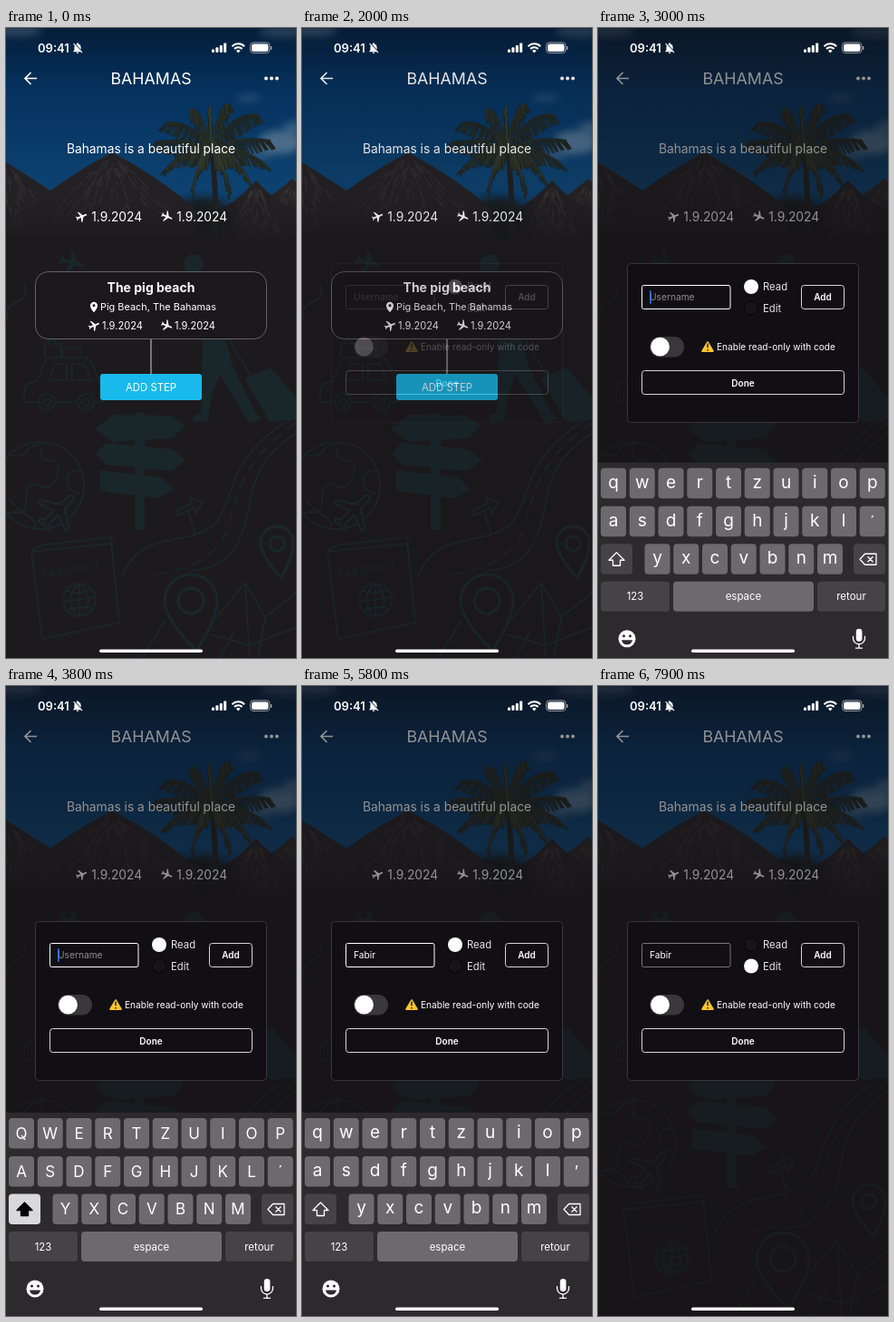
An HTML page for the animation above (8000 ms loop, 320 px wide and 694 px high).

```html
<!DOCTYPE html>
<html lang="en">
<head>
<meta charset="utf-8">
<title>Trip sharing</title>
<style>
html, body { margin: 0; height: 100%; overflow: hidden; background: #1d1a1d; }
svg { display: block; width: 100vw; height: 100vh; }
text { font-family: Inter, Roboto, sans-serif; white-space: pre; }
</style>
</head>
<body>
<svg id="stage" viewBox="0 0 320 694" fill="#fff"></svg>
<script>
const icons = {
  plane: 'M21 16v-2l-8-5V3.5C13 2.7 12.3 2 11.5 2S10 2.7 10 3.5V9l-8 5v2l8-2.5V19l-2 1.5V22l3.5-1 3.5 1v-1.5L13 19v-5.5z',
  pin: 'M12 2C8.1 2 5 5.1 5 9c0 5.3 7 13 7 13s7-7.7 7-13c0-3.9-3.1-7-7-7zm0 9.5a2.5 2.5 0 1 1 0-5 2.5 2.5 0 0 1 0 5z',
  share: 'M18 16a3 3 0 0 0-2 .8l-7-4.1a3 3 0 0 0 0-1.4l7-4.1a3 3 0 1 0-1-1.5L8 9.8a3 3 0 1 0 0 4.4l7.1 4.2A2.9 2.9 0 1 0 18 16z',
  edit: 'M3 17.2V21h3.8L17.8 9.9l-3.7-3.7zM20.7 7a1 1 0 0 0 0-1.4l-2.3-2.3a1 1 0 0 0-1.4 0l-1.9 1.8 3.8 3.8z',
  bin: 'M6 19a2 2 0 0 0 2 2h8a2 2 0 0 0 2-2V7H6zM19 4h-3.5l-1-1h-5l-1 1H5v2h14z',
  bell: 'M20 18.7L5.3 3.5 4 4.8l2.8 2.8A7 7 0 0 0 6 11v5l-2 2v1h13.7l2 2 1.3-1.3zM12 22a2 2 0 0 0 2-2h-4a2 2 0 0 0 2 2zm6-7.3V11c0-3.1-1.6-5.6-4.5-6.3V4a1.5 1.5 0 0 0-3 0v.7l-1.4.5z',
};
const icon = (name, x, y, size, turn = 0, attr = '') =>
  `<path transform="translate(${x} ${y}) rotate(${turn}) scale(${size / 24}) translate(-12 -12)" d="${icons[name]}" ${attr}/>`;
// y is the middle of the capital letters
const text = (x, y, str, size, attr = 'text-anchor="middle"') =>
  `<text x="${x}" y="${y + size * .364}" font-size="${size}" ${attr}>${str}</text>`;
const box = (x, y, w, h, r, attr = '') =>
  `<rect x="${x}" y="${y}" width="${w}" height="${h}" rx="${r}" ${attr}/>`;
const dot = (x, y, r, attr = '') => `<circle cx="${x}" cy="${y}" r="${r}" ${attr}/>`;
const path = (d, attr = '') => `<path d="${d}" ${attr}/>`;

let seed = 7;
const rand = () => (seed = seed * 16807 % 2147483647) / 2147483647;

function hut(x, y, left, right, colour) {
  const half = (right - left) / 2;
  const d = `M${x} ${y}Q${x - half * .55} ${y + 27} ${left} 200V232H${right}V200Q${x + half * .55} ${y + 27} ${x} ${y}`;
  let straw = '';
  for (let i = 0; i < 110; i++) {
    const side = (rand() * 2 - 1) * half * .85, a = .1 + rand() * .8, b = a + .05 + rand() * .1;
    straw += `M${x + side * a} ${y + 75 * a}L${x + side * b} ${y + 75 * b}`;
  }
  return path(d, `fill="${colour}"`) + path(straw, 'stroke="#57504d" stroke-width=".8" opacity=".4"');
}

function palm(cx, cy, tips) {
  let d = '';
  for (const [x, y] of tips) {
    const mx = (cx + x) / 2, my = Math.min(cy, y) - 6;
    d += `M${cx} ${cy}Q${mx} ${my} ${x} ${y}`;
    for (let t = .1; t < 1; t += .035) {
      const u = 1 - t, px = u * u * cx + 2 * u * t * mx + t * t * x, py = u * u * cy + 2 * u * t * my + t * t * y;
      const len = 26 * (1 - t * .65);
      d += `M${px} ${py}l${(x - cx) / 8 + rand() * 6 - 3} ${len}`;
    }
  }
  return path(`M${cx - 2} ${cy}q6 50 4 102h7q0-55-5-102z`, 'fill="#211f1f"') +
    path(d, 'fill="none" stroke="#171e20" stroke-width="2"') +
    path(d, 'fill="none" stroke="#3b412f" stroke-width=".6" opacity=".7"');
}

const blur = (x, y, rx, ry, opacity, colour = '#8094a6') =>
  `<ellipse cx="${x}" cy="${y}" rx="${rx}" ry="${ry}" fill="${colour}" opacity="${opacity}" filter="url(#soft)"/>`;

const photo = `<g clip-path="url(#photo)">${box(0, 0, 320, 232, 0, 'fill="url(#sky)"')}
  ${blur(12, 3, 28, 6, .35)}${blur(305, 4, 26, 6, .3)}${blur(302, 126, 24, 13, .55)}${blur(268, 77, 14, 4, .25)}
  ${blur(276, 140, 18, 6, .3)}${blur(318, 110, 12, 7, .4)}
  ${hut(0, 148, -80, 80, '#242124')}${hut(316, 166, 262, 376, '#282426')}${hut(276, 168, 232, 322, '#242124')}
  ${blur(216, 212, 34, 26, .95, '#191c1e')}
  ${palm(226, 133, [[164, 126], [176, 105], [203, 90], [225, 86], [247, 84], [279, 96], [292, 124], [286, 150], [270, 172], [246, 182], [206, 180], [177, 155]])}
  ${hut(117, 137, 22, 210, '#242124')}
  ${box(0, 180, 320, 52, 0, 'fill="url(#fade)"')}</g>`;

const doodles = `<g fill="none" stroke="#19282c" stroke-width="1.7" stroke-linejoin="round">
  <g fill="#19262a" stroke="none">${icon('plane', 73, 259, 34, 105)}${dot(207, 260, 11)}
  ${path('M190 272h38l15 71 7 29 26 53 6 5-13 6-33-54-9 23-4 28-16 1v-7l8-3 2-82z')}
  ${path('M263 386l29-12 28 33v24l-29 3z')}
  ${path('M142 424h11v129h-11zM118 426l65 1 14 11-13 14-66 4-20-14zM110 457l74 7 14 13-16 11-72-7-11-12zM104 487l68 8 14 13-16 10-66-8z')}</g>
  ${path('M243 338l27 45M20 283q5 14-9 19t-8 22')}
  ${path('M43 363v-15h18v15M62 363v-10h20v10M47 348v-4h8v4M20 412v-13q1-9 14-10l10-22q2-4 6-4h37q4 0 7 5l9 21q4 2 4 9v14H98M36 412H20M55 412h22M48 388l6-18h13v18zM73 388v-18h13l8 18z')}
  ${dot(45, 412, 9)}${dot(45, 412, 4)}${dot(88, 412, 9)}${dot(88, 412, 4)}
  ${dot(38, 504, 48)}
  ${path('M5 470q14 4 18-4t20-8M40 463q-6 12 8 13t8 18-20 10-14 17-18-3M84 489q-14-6-16 8t14 16M2 535q14-5 24 4t4 11')}
  ${icon('plane', 58, 533, 56, 45, 'fill="#1d1a1d" stroke-width="1"')}
  ${path('M28 577l10-7 78-9 9 94-85 18zM28 577l88-9 9 87M28 577l12 96')}
  ${dot(81, 630, 18)}${path('M63 632l36-5M81 612v36M81 612q-20 18 0 36M81 612q20 18 0 36M66 620q15 5 29-2M67 641q15-5 28-2')}
  ${path('M129 602c20-48 68-32 97-52s10-78 94-122M202 598c52-2 61-42 67-76s18-54 51-76')}
  ${path('M165 602c50-7 75-27 83-62s20-70 72-105', 'stroke-dasharray="12 9"')}
  ${path('M187 532l18-8-2-6 13 5-6 12-2-6-19 8zM201 531l8 27')}
  ${path('M210 686q-35-35-35-55a29 29 0 0 1 58 0q0 20-23 55zM304 606q-23-25-23-39a18 18 0 0 1 36 0q0 14-13 39z', 'stroke-width="3"')}
  ${dot(204, 631, 14, 'stroke-width="3"')}${dot(299, 568, 8, 'stroke-width="3"')}
  ${path('M150 694l26-42M230 652l34-41 22 38 34-27M264 611l5 83M286 649l-8 45M226 668l43 12 51-20M236 694l16-30')}
  </g>${text(72, 597, 'PASSPORT', 11, 'text-anchor="middle" fill="#19282c" letter-spacing="1" transform="rotate(-9 72 597)"')}`;

const dates = (x, y, gap, size) => [0, 1].map(i => icon('plane', x + gap * i, y, 14.8, i ? 113 : 68) +
  text(x + gap * i + size * .78, y, '1.9.2024', size, '')).join('');

const page = `${photo}${doodles}
  ${path('M34 55.5H21M27.5 49L21 55.5l6.5 6.5', 'fill="none" stroke="#fff" stroke-width="1.7"')}
  ${text(160, 56, 'BAHAMAS', 17.8)}${[287, 293, 299].map(x => dot(x, 55.5, 2)).join('')}
  ${text(160, 133, 'Bahamas is a beautiful place', 13.8)}${dates(83.5, 208, 94, 13.8)}
  ${box(32.5, 268.5, 255, 74, 14, 'fill="#1b181b" stroke="#77757a" stroke-width=".8"')}
  ${text(160, 286, 'The pig beach', 14, 'text-anchor="middle" font-weight="700"')}
  ${icon('pin', 97, 307.5, 14)}${text(104, 307, 'Pig Beach, The Bahamas', 10.9, '')}${dates(97.3, 328, 80, 11.1)}
  ${box(159, 343, 2, 38, 0, 'fill="#77757a"')}
  ${box(104, 381, 112, 29, 3, 'fill="#19b9eb"')}${text(160, 396, 'ADD STEP', 11.4)}`;

const menu = `<g id="menu">${box(156, 44.5, 148, 143.5, 0, 'fill="#161316" stroke="#77757a" stroke-width=".8"')}
  <g id="shareRow">${text(175, 71.5, 'SHARE', 11.4, '')}${icon('share', 277, 71, 14)}</g>
  ${text(175, 116.5, 'EDIT', 11.4, '')}${icon('edit', 277, 116.5, 15)}
  ${text(175, 162, 'DELETE', 11.4, '')}${icon('bin', 277, 162, 15)}
  ${path('M173.500 93.500H286M173.500 139H286', 'stroke="#77757a" stroke-width=".8"')}</g>`;

const frame = 'fill="none" stroke="#d5d5d7" stroke-width="1"';
const bold = 'text-anchor="middle" font-weight="600"';
const radio = (id, y, label) => dot(169, y, 7.5, 'fill="#171418" stroke="#050405"') +
  dot(169, y, 8, `id="${id}"`) + text(182, y, label, 11.3, 'fill="#e4e4e6"');
const dialog = `<g id="dialog">${box(0, 0, 320, 694, 0, 'fill="#121012" opacity=".46"')}
  ${box(32.5, 259.5, 255, 175, 4, 'fill="#110f13" stroke="#39363c"')}
  ${box(48.5, 283.5, 97.5, 26, 2, 'id="field" fill="none"')}
  ${text(57, 296.5, '', 10.2, 'id="user"')}${box(57, 289, 1.6, 15, .8, 'id="caret" fill="#2878e6"')}
  ${radio('read', 285, 'Read')}${radio('edit', 308.5, 'Edit')}
  ${box(224.5, 283.5, 47, 26, 3, frame)}${text(248, 296.5, 'Add', 10, bold)}
  ${box(57, 340, 38, 22.5, 11.2, 'fill="#39373b"')}${dot(68.5, 351.2, 10.4)}
  ${path('M121 346.200l5.800 9.800h-11.600z', 'fill="#fbc52d" stroke="#fbc52d" stroke-width="2" stroke-linejoin="round"')}
  ${path('M121 347.500v4.800M121 354v1.600', 'stroke="#222" stroke-width="1.5"')}
  ${text(131, 351.2, 'Enable read-only with code', 10.1, '')}
  ${box(48.5, 377.5, 223, 26, 3, frame)}${text(160, 391, 'Done', 10, bold)}</g>`;

const keys = [];
const addRow = (letters, x, y) => [...letters].forEach((c, i) => keys.push({ c, x: x + i * 31.75, y }));
addRow('qwertzuiop', 17, 476);
addRow('asdfghjkl´', 17, 518);
addRow('yxcvbnm', 65.5, 559.5);
const dark = 'fill="#454347"', light = 'fill="#6c6a6e"';
const keyboard = `<g id="keyboard">${box(0, 470, 320, 224, 0, 'fill="#2c2a2d"')}
  ${keys.map(k => box(k.x - 14, k.y, 28, 33.5, 4, light) + `<text class="key" x="${k.x}" text-anchor="middle"/>`).join('')}
  ${box(3, 559.5, 35, 33.5, 4, 'id="shift"')}
  ${path('M20.500 569l8.500 8.500h-4.500v6h-8v-6H12z', 'id="arrow" stroke-width="1.3" stroke-linejoin="round"')}
  ${box(282, 559.5, 35, 33.5, 4, dark)}
  ${path('M289 576.500l5.500-6h12.500v12h-12.500zM297.500 573.500l6 6M303.500 573.500l-6 6', 'fill="none" stroke="#fff" stroke-width="1.3" stroke-linejoin="round"')}
  ${box(3, 601, 76, 33, 4, dark)}${text(41, 617.5, '123', 11.3)}
  ${box(83, 601, 155, 33, 4, light)}${text(160.5, 617.5, 'espace', 11.5)}
  ${box(242, 601, 75, 33, 4, dark)}${text(279.5, 617.5, 'retour', 11.5)}
  ${dot(32, 664, 9.5)}${dot(28.5, 661, 1.5, 'fill="#2c2a2d"')}${dot(35.5, 661, 1.5, 'fill="#2c2a2d"')}
  ${path('M26 665.500h12q-1 5-6 5t-6-5z', 'fill="#2c2a2d"')}
  ${box(284.8, 653, 6.6, 14, 3.3)}
  ${path('M281.500 661v2.500a6.500 6.500 0 0 0 13 0V661M288 670v4M284 674.300h8', 'fill="none" stroke="#fff" stroke-width="1.3"')}
  <g id="popup">${path('M-23-40q0-6 6-6h34q6 0 6 6v28c0 8-9 7-9 14V29.500q0 4-4 4h-20q-4 0-4-4V2c0-7-9-6-9-14z', light)}
  <text id="popChar" y="-16" font-size="26" font-weight="300" text-anchor="middle"/></g></g>`;

const status = `${text(35, 22, '09:41', 13, 'font-weight="600"')}${icon('bell', 79, 22, 14.5)}
  ${[0, 1, 2, 3].map(i => box(227 + i * 4.4, 23.5 - i * 2.3, 3, 3.5 + i * 2.3, 1)).join('')}
  ${path('M249.500 20.200a9.500 9.500 0 0 1 13.600 0M252 23a6 6 0 0 1 8.600 0', 'fill="none" stroke="#fff" stroke-width="2"')}
  ${path('M256.300 27.500l-2.300-2.400a3.200 3.200 0 0 1 4.600 0z')}
  ${box(269.5, 16, 21.5, 11.5, 3.5, 'fill="none" stroke="#a5a9ae" stroke-width=".9"')}${box(271, 17.5, 18.5, 8.5, 2.3)}
  ${box(292, 20, 1.3, 4, .6, 'fill="#a5a9ae"')}`;

const $ = id => document.getElementById(id);
$('stage').innerHTML = `<defs>
  <linearGradient id="sky" x2="0" y2="1"><stop stop-color="#051d38"/><stop offset=".3" stop-color="#05325f"/><stop offset=".75" stop-color="#0d4270"/></linearGradient>
  <linearGradient id="fade" x2="0" y2="1"><stop stop-color="#1d1a1d" stop-opacity="0"/><stop offset="1" stop-color="#1a181b" stop-opacity=".7"/></linearGradient>
  <filter id="soft" x="-50%" y="-100%" width="200%" height="300%"><feGaussianBlur stdDeviation="4"/></filter>
  <clipPath id="photo">${box(0, 0, 320, 232, 0)}</clipPath></defs>
  ${box(0, 0, 320, 694, 0, 'fill="#1d1a1d"')}${page}${menu}${dialog}${keyboard}${status}${box(103, 684.5, 114, 3.5, 1.7)}`;
const labels = document.querySelectorAll('.key');

const ramp = (t, a, b) => Math.min(1, Math.max(0, (t - a) / (b - a)));
const ease = x => x * x * (3 - 2 * x);
const spring = ms => ms <= 0 ? 0 : 1 - (1 + ms * .0172) * Math.exp(-ms * .0172);
const set = (id, attrs) => { for (const a in attrs) $(id).setAttribute(a, attrs[a]); };

const name = 'Fabir', presses = [4200, 4600, 4700, 4800, 5000], hold = 100;

function draw(t) {
  const open = ease(ramp(t, 900, 1250));
  set('menu', { opacity: open * (1 - ramp(t, 1680, 1880)), transform: `translate(304 44) scale(${open}) translate(-304 -44)` });
  set('shareRow', { opacity: 1 - .6 * ramp(t, 1560, 1640) });
  set('dialog', { opacity: ease(ramp(t, 1850, 2350)) });

  const focused = t >= 2700 && t < 6150;
  const typed = name.slice(0, presses.filter(p => t >= p + hold).length);
  $('user').textContent = typed || 'Username';
  set('user', { fill: typed ? '#fff' : '#8e8c92' });
  set('field', { stroke: focused ? '#fff' : '#77757a' });
  set('caret', { x: 57 + (typed ? $('user').getComputedTextLength() : 0), opacity: focused ? 1 - ramp(t, 5650, 5800) : 0 });
  const swap = ramp(t, 7250, 7500);
  set('read', { opacity: 1 - swap });
  set('edit', { opacity: swap });

  const caps = t >= 3600 && t < 4400;
  const shown = spring(t - 2708) - spring(t - 6298);
  set('keyboard', { transform: `translate(0 ${224 * (1 - shown)})` });
  const press = presses.findIndex(p => t >= p && t < p + hold);
  const held = press < 0 ? '' : name[press];
  keys.forEach((k, i) => {
    const mark = k.c === '´';
    labels[i].textContent = k.c === held.toLowerCase() ? '' : mark && t >= 4400 && t < 6250 ? '’' : caps ? k.c.toUpperCase() : k.c;
    labels[i].setAttribute('font-size', caps || mark ? 17 : 19);
    labels[i].setAttribute('y', k.y + (caps || mark ? 22.8 : 21.8));
  });
  set('shift', { fill: caps ? '#d9d8dc' : '#454347' });
  set('arrow', { fill: caps ? '#000' : 'none', stroke: caps ? '#000' : '#fff' });
  set('popup', { opacity: held ? 1 : 0 });
  if (held) {
    const k = keys.find(k => k.c === held.toLowerCase());
    set('popup', { transform: `translate(${Math.max(25, k.x)} ${k.y})` });
    $('popChar').textContent = held;
  }
}

const start = performance.now();
function tick() {
  draw((performance.now() - start) % 8000);
  requestAnimationFrame(tick);
}
tick();
</script>
</body>
</html>
```
